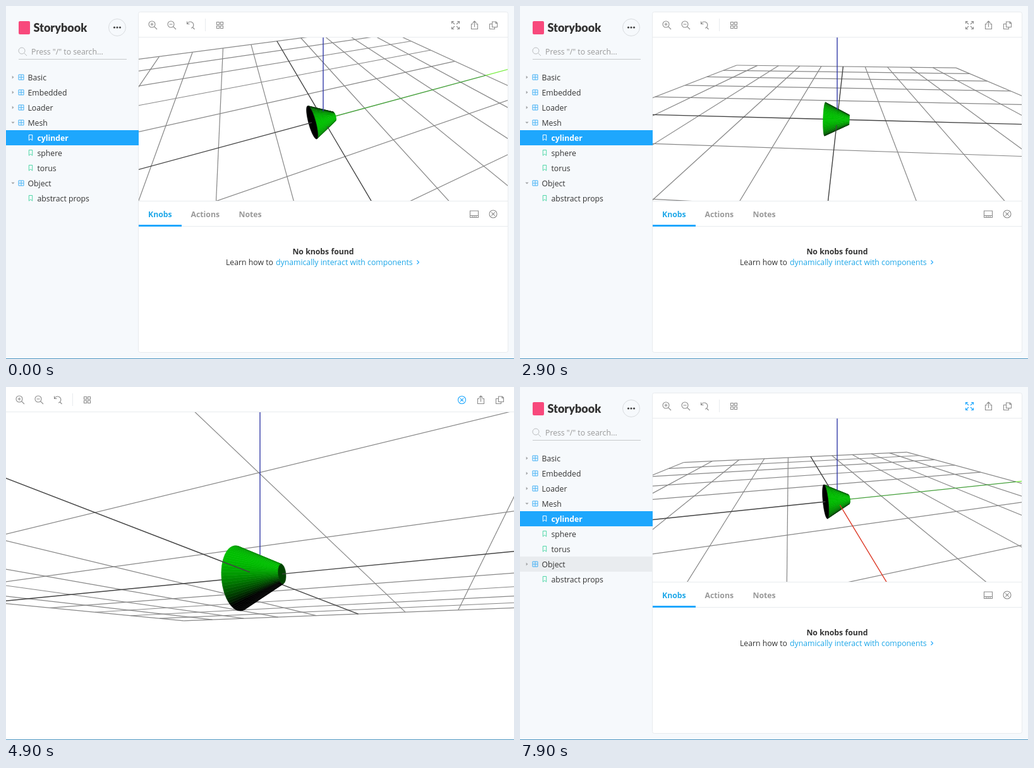
An HTML page with a canvas that plays this animation: 804 px wide and 560 px high, repeating every 8000 ms.

```html
<!DOCTYPE html>
<html lang="en">
<head>
<meta charset="utf-8">
<title>Storybook mesh viewer</title>
<style>
  html, body { margin: 0; width: 100%; height: 100%; overflow: hidden; background: #f6f9fc; }
  svg, canvas { position: absolute; left: 0; top: 0; }
  text { font: 12.25px "Open Sans", sans-serif; fill: #333; white-space: pre; }
  .bold { font-weight: 700; }
  .muted { fill: #999; }
  .link { fill: #1ea7e8; }
  .icon { fill: none; stroke: #8c8c8c; stroke-width: 1.1; }
  .icon.active { stroke: #1ea7fd; }
  .edge { stroke: #e8ebee; fill: none; }
</style>
</head>
<body>
<svg id="ui" width="804" height="560" viewBox="0 0 804 560"></svg>
<canvas id="view"></canvas>
<script>
const LOOP = 8000, STEP = 100;
const FULL_ON = 3600, FULL_OFF = 6600;
const byId = id => document.getElementById(id);

// ---------- interface ----------
const text = (x, y, label, cls = '', extra = '') => `<text x="${x}" y="${y}" class="${cls}" ${extra}>${label}</text>`;
const icon = (x, y, d, id = '') => `<path ${id && `id="${id}"`} class="icon" transform="translate(${x} ${y})" d="${d}"/>`;
const disc = (r, x = 0, y = 0) => `M${x - r} ${y}a${r} ${r} 0 1 0 ${2 * r} 0a${r} ${r} 0 1 0 ${-2 * r} 0`;

const glass = disc(5, -1, -1) + 'M2.6 2.6L7 7';
const cross = disc(6) + 'M-2.7-2.7L2.7 2.7M2.7-2.7L-2.7 2.7';
const corner = (x, y) => `M${x} ${y}L${x / 4} ${y / 4}M${x * .4} ${y}H${x}V${y * .4}`;
const expand = corner(6, 6) + corner(-6, 6) + corner(6, -6) + corner(-6, -6);
const tiles = [[-5, -5], [1, -5], [-5, 1], [1, 1]].map(([x, y]) => `M${x} ${y}h4v4h-4z`).join('');
const share = 'M-2-2H-5V6H5V-2H2M0 3V-6M-3-3.5L0-6.5L3-3.5';
const copy = 'M-2-5.5H4L6-3.5V3H-2zM-2-2H-6V6H2V3M3.5-5.5V-3H6';
const undo = 'M-5.5-5.5V-1.5H-1.5M-5-2A5.2 5.2 0 1 1 1 5.2M3 3.5L6.5 7';

const rows = [
  ['Basic', 'closed'], ['Embedded', 'closed'], ['Loader', 'closed'], ['Mesh', 'open'],
  ['cylinder'], ['sphere'], ['torus'], ['Object', 'open'], ['abstract props']
];
const arrows = { closed: 'M-1.3-2.5L1.5 0L-1.3 2.5z', open: 'M-2.7-1.3L0 1.5L2.7-1.3z' };

function treeRow([label, state], i) {
  const y = 113 + 24 * i, selected = label === 'cylinder';
  if (state) {
    return `<path id="arrow-${label}" transform="translate(11 ${y})" d="${arrows[state]}" fill="#a4a6a8"/>
      <path transform="translate(24 ${y})" d="M-4-4H4V4H-4zM0-4V4M-4 0H4" fill="none" stroke="#42b0f5"/>` +
      text(34.5, y + 4.5, label);
  }
  return (selected ? `<rect y="${y - 16}" width="210" height="24" transform="translate(0 4)" fill="#1ea7fd"/>` : '') +
    `<path transform="translate(39 ${y})" d="M-2.7-4.5H2.7V4.2L0 1.8L-2.7 4.2z" fill="none" stroke="${selected ? '#fff' : '#50d8a8'}"/>` +
    text(49.5, y + 4.5, label, selected ? 'bold' : '', selected ? 'style="fill:#fff"' : '');
}

byId('ui').innerHTML = `
  <rect id="backdrop" width="804" height="560" fill="#fff"/>
  <g id="chrome">
    <rect x="209.5" y="9.5" width="585" height="540" rx="3" fill="#fff" stroke="#e8ebee"/>
    <rect x="20" y="24" width="18" height="21" rx="2" fill="#f8497c"/>
    ${text(43.5, 40.5, 'Storybook', '', 'style="font:900 18px Lato,sans-serif"')}
    <circle cx="176" cy="34" r="13.5" class="edge" style="stroke:#d9dcdf"/>
    <path d="${disc(1.6, 171.5, 34) + disc(1.6, 176, 34) + disc(1.6, 180.5, 34)}" fill="#444"/>
    <path transform="translate(26 72)" d="${glass}" fill="none" stroke="#b4b6b8" stroke-width=".9"/>
    ${text(40, 77, 'Press "/" to search...', 'muted')}
    <path d="M20 84.5H191" stroke="#c6c9cb"/>
    <rect id="hover" y="269" width="209" height="24" fill="#e9ecef"/>
    ${rows.map(treeRow).join('')}
    <path d="M210 309.5H794M210 349.5H794" class="edge"/>
    <rect x="210" y="347" width="68" height="3" fill="#1ea7fd"/>
    ${text(225, 335, 'Knobs', 'bold link')}
    ${text(292.5, 335, 'Actions', 'bold muted')}
    ${text(368.5, 335, 'Notes', 'bold muted')}
    ${icon(741, 330, 'M-6.5-5H6.5V5.5H-6.5zM-6.5 2.5H6.5M-3 2.5V5M0 2.5V5M3 2.5V5')}
    ${icon(771, 330, cross)}
    ${text(502, 394, 'No knobs found', 'bold', 'text-anchor="middle"')}
    ${text(348, 411, 'Learn how to')}
    ${text(427, 411, 'dynamically interact with components', 'link')}
    <path d="M650.5 403.5L653.5 406.5L650.5 409.5" class="icon active"/>
  </g>
  <path id="toolLine" class="edge"/>
  <g id="toolsLeft">
    ${icon(232, 30, glass + 'M-3.5-1H1.5M-1-3.5V1.5')}
    ${icon(262, 30, glass + 'M-3.5-1H1.5')}
    ${icon(292, 30, undo)}
    <path d="M315.5 20V40" class="edge"/>
    ${icon(338.5, 30.5, tiles)}
  </g>
  <g id="toolsRight">
    ${icon(711.5, 30.5, expand, 'toggle')}
    ${icon(741.5, 30.5, share)}
    ${icon(771.5, 30.5, copy)}
  </g>
  <rect y="559" width="804" height="1" fill="#4a94c0"/>`;

function updateInterface(t, full) {
  byId('chrome').style.display = full ? 'none' : '';
  byId('backdrop').style.display = full ? '' : 'none';
  byId('toolLine').setAttribute('d', full ? 'M0 39.5H804' : 'M210 49.5H794');
  byId('toolsLeft').setAttribute('transform', full ? 'translate(-210 -10)' : '');
  byId('toolsRight').setAttribute('transform', full ? 'translate(10 -10)' : '');
  byId('toggle').setAttribute('d', full ? cross : expand);
  byId('toggle').classList.toggle('active', t >= 3400);
  byId('hover').style.opacity = Math.min(1, Math.max(0, (t - 7300) / 400));
  byId('arrow-Object').setAttribute('d', arrows[t >= 7900 ? 'closed' : 'open']);
}

// ---------- 3D scene ----------
const view = byId('view'), ctx = view.getContext('2d');
const DIST = 3.67, NEAR = 0.08, HALF = 5, AXIS = 10;
const CONE = { half: 0.25, base: 0.35, top: 0.1, sides: 64 };
const LIGHT = [0.75, 0.35, 0.56];

// time, azimuth of the y axis, camera elevation
const poses = [
  [1300, 68.2, 42.8], [1900, 189.2, 28.9], [2900, 93.1, 29], [3100, 135, 29],
  [4300, 135, 29], [4900, 116.7, -11.2], [5700, 52.3, 25.5], [6100, 75.9, 24.6]
];

function poseAt(t) {
  const next = poses.findIndex(p => p[0] > t);
  if (next === 0) return poses[0].slice(1);
  if (next < 0) return poses[poses.length - 1].slice(1);
  const a = poses[next - 1], b = poses[next];
  const u = (t - a[0]) / (b[0] - a[0]), k = u * u * (3 - 2 * u);
  return [1, 2].map(i => a[i] + (b[i] - a[i]) * k);
}

const dot = (a, b) => a[0] * b[0] + a[1] * b[1] + a[2] * b[2];

function drawScene(t, full) {
  const width = full ? 804 : 584, height = full ? 519 : 259;
  view.width = width;
  view.height = height;
  view.style.left = full ? '0' : '210px';
  view.style.top = full ? '40px' : '50px';

  const cx = width / 2, cy = full ? 260 : 130;
  const focal = cy / Math.tan(25 * Math.PI / 180);
  const [az, el] = poseAt(t).map(v => v * Math.PI / 180);
  const sa = Math.sin(az), ca = Math.cos(az), se = Math.sin(el), ce = Math.cos(el);
  const eye = [DIST * ce * sa, -DIST * ce * ca, DIST * se];

  const toCamera = ([x, y, z]) => {
    const forward = y * ca - x * sa;
    return [x * ca + y * sa, forward * se + z * ce, DIST + forward * ce - z * se];
  };
  const toScreen = ([x, y, depth]) => [cx + focal * x / depth, cy - focal * y / depth];
  const project = p => toScreen(toCamera(p));
  const faces = (point, normal) => dot(normal, eye.map((v, i) => v - point[i])) > 0;

  function line(from, to, color, weight = 1.2) {
    let a = toCamera(from), b = toCamera(to);
    if (a[2] < NEAR && b[2] < NEAR) return;
    if (a[2] > b[2]) [a, b] = [b, a];
    if (a[2] < NEAR) {
      const k = (NEAR - a[2]) / (b[2] - a[2]);
      a = a.map((v, i) => v + (b[i] - v) * k);
    }
    ctx.beginPath();
    ctx.moveTo(...toScreen(a));
    ctx.lineTo(...toScreen(b));
    ctx.strokeStyle = color;
    ctx.lineWidth = weight;
    ctx.stroke();
  }

  function polygon(points, normal) {
    if (!faces(points[0], normal)) return;
    const green = Math.round(192 * Math.min(1, Math.max(0, dot(normal, LIGHT))));
    ctx.fillStyle = ctx.strokeStyle = `rgb(0,${green},0)`;
    ctx.lineWidth = 0.6;
    ctx.beginPath();
    points.forEach(p => ctx.lineTo(...project(p)));
    ctx.closePath();
    ctx.fill();
    ctx.stroke();
  }

  for (let i = -HALF; i <= HALF; i++) {
    if (!i) continue;
    line([i, -HALF, 0], [i, HALF, 0], '#868686');
    line([-HALF, i, 0], [HALF, i, 0], '#868686');
  }

  // half axes: direction, exit distance from the cone, surface normal there, colour, length
  const dark = '#424242', mid = (CONE.base + CONE.top) / 2, slope = 0.447, radial = 0.894;
  const greenAxis = t < 2400 || t > 5300, redAxis = t > 5900;
  const halfAxes = [
    [[1, 0, 0], mid, [radial, slope, 0], redAxis ? '#dd3a28' : dark, HALF],
    [[-1, 0, 0], mid, [-radial, slope, 0], dark, HALF],
    [[0, 1, 0], CONE.half, [0, 1, 0], greenAxis ? '#46a03c' : dark, HALF],
    [[0, -1, 0], CONE.half, [0, -1, 0], dark, HALF],
    [[0, 0, 1], mid, [0, slope, radial], '#343ca8', AXIS]
  ];
  const drawAxes = inFront => halfAxes.forEach(([dir, exit, normal, color, length]) => {
    const start = dir.map(v => v * exit);
    if (faces(start, normal) === inFront) line(start, dir.map(v => v * length), color, 1.4);
  });

  line([0, HALF, 0], [0, AXIS, 0], '#78ee40', 1.4);
  drawAxes(false);

  const ring = (r, y) => Array.from({ length: CONE.sides }, (_, i) => {
    const a = i / CONE.sides * 2 * Math.PI;
    return [r * Math.cos(a), y, r * Math.sin(a)];
  });
  const base = ring(CONE.base, -CONE.half), top = ring(CONE.top, CONE.half);
  base.forEach((p, i) => {
    const j = (i + 1) % CONE.sides, a = (i + 0.5) / CONE.sides * 2 * Math.PI;
    polygon([p, base[j], top[j], top[i]], [radial * Math.cos(a), slope, radial * Math.sin(a)]);
  });
  polygon(base, [0, -1, 0]);
  polygon(top, [0, 1, 0]);

  drawAxes(true);
}

// ---------- playback ----------
const startTime = performance.now();
let shown = -1;
function tick() {
  const t = Math.floor((performance.now() - startTime) % LOOP / STEP) * STEP;
  if (t !== shown) {
    const full = t >= FULL_ON && t < FULL_OFF;
    updateInterface(t, full);
    drawScene(t, full);
    shown = t;
  }
  requestAnimationFrame(tick);
}
tick();
</script>
</body>
</html>
```
